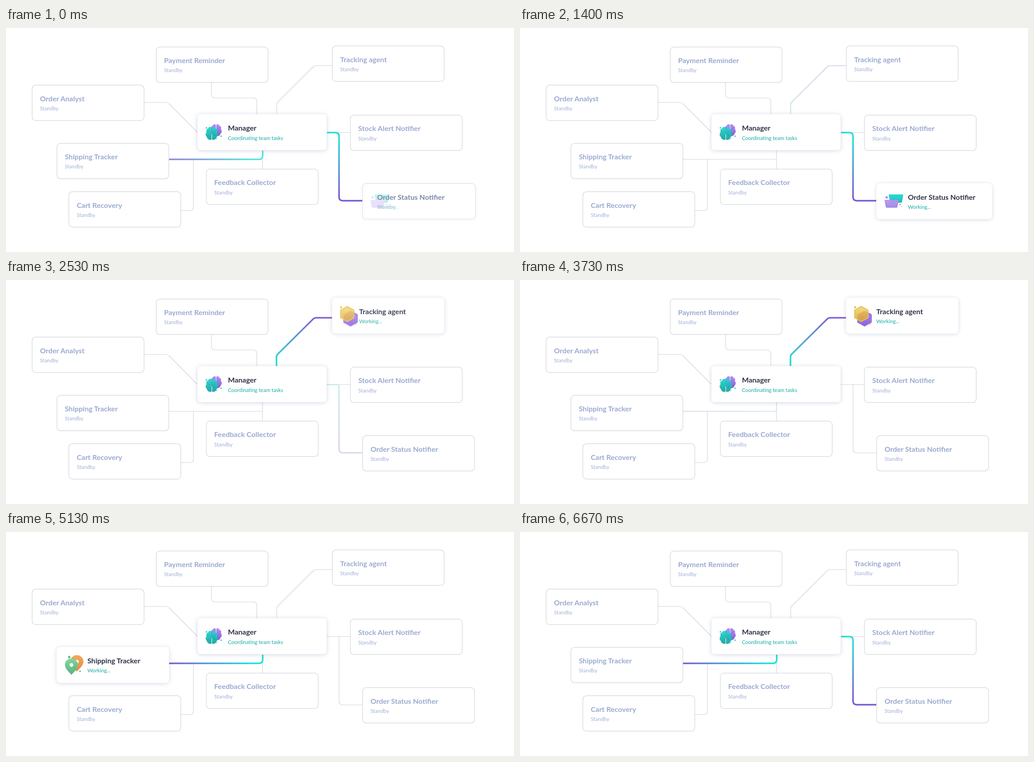
An HTML page for the animation above (6800 ms loop, 1125 by 498 pixels).

```html
<!DOCTYPE html>
<html lang="en">
<head>
<meta charset="utf-8">
<title>Agent team</title>
<style>
  html, body { margin: 0; width: 100%; height: 100%; overflow: hidden; background: #fff; }
  svg { display: block; width: 100%; height: 100%; }
  text { font-family: Lato, sans-serif; }
  .title { font-size: 16px; font-weight: 700; fill: #9aaad0; }
  .sub { font-size: 11.5px; fill: #9fafd6; }
  .busy { fill: #12aca4; }
  .dark { fill: #2f3347; }
  .wire { fill: none; stroke: #d2d4d9; stroke-width: 1.2; }
  .live { fill: none; stroke-width: 3.5; }
  .box { fill: #fff; stroke: #d3d5da; stroke-width: 1.2; }
  .glow { fill: #fff; filter: drop-shadow(0 1px 5px rgba(85, 100, 155, .27)); }
</style>
</head>
<body>
<svg viewBox="0 0 1125 498">
  <defs>
    <linearGradient id="gOrder" gradientUnits="userSpaceOnUse" x1="0" y1="232" x2="0" y2="384">
      <stop offset=".08" stop-color="#22e0d6"/><stop offset=".92" stop-color="#7a5ad3"/>
    </linearGradient>
    <linearGradient id="gTrack" gradientUnits="userSpaceOnUse" x1="0" y1="190" x2="0" y2="84">
      <stop offset=".12" stop-color="#22dcd4"/><stop offset="1" stop-color="#8460d8"/>
    </linearGradient>
    <linearGradient id="gShip" gradientUnits="userSpaceOnUse" x1="568" y1="0" x2="361" y2="0">
      <stop offset=".1" stop-color="#22e0d6"/><stop offset="1" stop-color="#7a5ad3"/>
    </linearGradient>
    <linearGradient id="teal" x2="0" y2="1"><stop stop-color="#20dccd"/><stop offset="1" stop-color="#1ba3a2"/></linearGradient>
    <linearGradient id="aqua" x2="0" y2="1"><stop stop-color="#22ddd0"/><stop offset="1" stop-color="#1fb9b6"/></linearGradient>
    <linearGradient id="violet" x2="0" y2="1"><stop stop-color="#b78ef6"/><stop offset="1" stop-color="#8660d6"/></linearGradient>
    <linearGradient id="lilac" x2="0" y2="1"><stop stop-color="#b795f3"/><stop offset="1" stop-color="#9a80df"/></linearGradient>
    <linearGradient id="gold" x2="0" y2="1"><stop stop-color="#f6df70"/><stop offset="1" stop-color="#dba647"/></linearGradient>
    <linearGradient id="orange" x2="0" y2="1"><stop stop-color="#f2a75c"/><stop offset="1" stop-color="#e58a45"/></linearGradient>
    <linearGradient id="green" x2="0" y2="1"><stop stop-color="#80d79c"/><stop offset="1" stop-color="#4bae78"/></linearGradient>

    <path id="half" d="M-.5-13.5C-3-16-8-14.500-8-11C-12-10-13-6-11.500-3C-14.500 0-14 6-11 7.500C-10.500 12-5 16-.5 13.500Z"/>
    <g id="brain"><use href="#half"/><use href="#half" transform="scale(-1 1)"/></g>
    <path id="hex" stroke-width="3" stroke-linejoin="round" d="M0-16.500L14.500-8.300V8.300L0 16.500L-14.500 8.300V-8.300Z"/>
    <path id="pin" fill-rule="evenodd" d="M0 22C-4 17-14.500 9-14.500 0A14.500 14.500 0 0 1 14.500 0C14.500 9 4 17 0 22ZM-4 0A4 4 0 0 0 4 0A4 4 0 0 0-4 0Z"/>
  </defs>

  <g class="wire">
    <path d="M455 121V147Q455 155.500 463 155.500H547Q555.500 155.500 555.500 164V192"/>
    <path d="M305 165.500H353Q358 165.500 361.500 169L424 232"/>
    <path d="M722 83.500H687Q683 83.500 680 86.500L602 164.500Q599.500 167 599.500 170V192"/>
    <path d="M710 232.500H762M737.500 232.500V376Q737.500 384.500 746 384.500H789"/>
    <path d="M361 292H568M568 271V313M387 406H407Q415 406 415 398V292"/>
  </g>
  <g class="live">
    <path id="lineOrder" stroke="url(#gOrder)" d="M711 232.500H729Q737.500 232.500 737.500 241V375.500Q737.500 384 746 384H789"/>
    <path id="lineTrack" stroke="url(#gTrack)" d="M722 84H687Q683 84 680 87L602 164.500Q599 167.500 599 171V191"/>
    <path id="lineShip" stroke="url(#gShip)" d="M361 292H560Q568.500 292 568.500 283.500V273"/>
  </g>

  <g id="cards"></g>

  <g id="manager">
    <rect class="glow" x="424" y="191.500" width="286" height="80" rx="8"/>
    <use href="#brain" fill="url(#violet)" transform="translate(465.200 227.500) scale(.93 .91)"/>
    <use href="#brain" fill="url(#teal)" opacity=".95" transform="translate(455.700 234.500)"/>
    <path d="M446 231q4-1 4 3M448 241q4 0 4-4M465 229q-4 1-4 4M465 240q-4 1-4-3M472 223q-3 0-3 4M470 235q3 0 4-3" fill="none" stroke="#137f8c" stroke-opacity=".3"/>
    <g fill="#20c9c0"><circle cx="444" cy="222" r="1.700"/><circle cx="476.300" cy="240.500" r="1.600"/><circle cx="466.500" cy="246" r="1"/></g>
    <text class="title dark" x="491.500" y="228">Manager</text>
    <text class="sub busy" x="491.500" y="248.500">Coordinating team tasks</text>
  </g>

  <g id="iconOrder">
    <path d="M818 370H847.500Q849 370 848.700 371.500L846 386.500Q845.500 388.500 843.500 388.500H822Q820 388.500 819.500 386.500L816.500 371.500Q816.300 370 818 370Z" fill="url(#aqua)"/>
    <path d="M808.500 382H837.500Q839 382 838.700 383.500L836 397.500Q835.500 399.500 833.500 399.500H812.500Q810.500 399.500 810 397.500L807.300 383.500Q807 382 808.500 382Z" fill="url(#lilac)" opacity=".95"/>
    <path d="M820 375.500H845M821 379.500H844M811 387.500H835M812 391.500H834M813 395.500H833" stroke="#fff" stroke-opacity=".18" stroke-dasharray="2 1.500"/>
    <g fill="#a98bea"><circle cx="812" cy="376.500" r="2.600"/><circle cx="841.500" cy="392.500" r="1.800"/><circle cx="844.800" cy="396.800" r="1.100"/></g>
  </g>
  <g id="iconTrack">
    <use href="#hex" x="763" y="85.500" fill="url(#violet)" stroke="#9870e2"/>
    <use href="#hex" x="755.800" y="75.500" fill="url(#gold)" stroke="#e8c35b" opacity=".94"/>
    <path d="M748.500 77.300L763 69L770.300 73.200V83.800L755.800 92L748.500 87.800Z" fill="#c98f3c" opacity=".3"/>
    <g fill="#e7b853"><circle cx="742" cy="60.800" r="2.300"/><circle cx="775" cy="98.200" r="1.400"/></g>
  </g>
  <g id="iconShip">
    <use href="#pin" x="157" y="288.300" fill="url(#orange)"/>
    <use href="#pin" x="145" y="295.500" fill="url(#green)" opacity=".95"/>
    <circle cx="145" cy="295.500" r="4" fill="#fff"/>
    <g fill="#5fbd87"><circle cx="140" cy="278" r="2.700"/><circle cx="164" cy="309.500" r="1.800"/></g>
  </g>
</svg>
<script>
const LOOP = 6800, SPAN = 600, FPS = 15;
const $ = id => document.getElementById(id);

function add(parent, tag, attrs, label) {
  const el = document.createElementNS('http://www.w3.org/2000/svg', tag);
  for (const k in attrs) el.setAttribute(k, attrs[k]);
  if (label) el.textContent = label;
  return parent.appendChild(el);
}

// cubic-bezier(.25, .1, .25, 1)
function ease(x) {
  if (x <= 0) return 0;
  if (x >= 1) return 1;
  const curve = (s, a, b) => 3 * s * (1 - s) ** 2 * a + 3 * s * s * (1 - s) * b + s ** 3;
  let lo = 0, hi = 1;
  for (let i = 0; i < 24; i++) {
    const mid = (lo + hi) / 2;
    if (curve(mid, .25, .25) < x) lo = mid; else hi = mid;
  }
  return curve(lo, .1, 1);
}

// 0..1 for something switched on and off once per loop
const level = (t, on, off) =>
  (on > off ? 1 : 0) + ease((t - on) / SPAN) - ease((t - off) / SPAN);
const mix = (a, b, p) => `rgb(${a.map((v, i) => Math.round(v + (b[i] - v) * p))})`;

function makeCard(name, x, y, act) {
  const g = add($('cards'), 'g');
  const rect = cls => add(g, 'rect', { class: cls, x: x + .6, y: y + .6, width: 247.800, height: 78.800, rx: 8 });
  const glow = act && rect('glow');
  const box = rect('box');
  if (act) g.append($(act.icon));
  const words = add(g, 'g');
  const text = (cls, dy, s) => add(words, 'text', { class: cls, x: x + 18, y: y + dy }, s);
  const title = text('title', 36.300, name);
  const idle = text('sub', 56.700, 'Standby');
  if (!act) return;
  const busy = text('sub busy', 56.700, 'Working...');
  const icon = $(act.icon);
  return t => {
    const p = level(t, act.on, act.off);
    const out = .5 * p;
    for (const r of [glow, box]) {
      r.setAttribute('x', x + .6 - out);
      r.setAttribute('y', y + .6 - out);
      r.setAttribute('width', 247.800 + 2 * out + act.grow * p);
      r.setAttribute('height', 78.800 + 2 * out);
    }
    glow.style.opacity = p;
    box.style.strokeOpacity = 1 - p;
    icon.style.opacity = p;
    words.setAttribute('transform', `translate(${act.shift * p} 0)`);
    title.style.fill = mix([154, 170, 208], [47, 51, 71], p);
    idle.style.opacity = 1 - p;
    busy.style.opacity = p;
  };
}

const cards = [
  makeCard('Payment Reminder', 332, 41.700),
  makeCard('Tracking agent', 722, 39.300, { icon: 'iconTrack', on: 2200, off: 3725, shift: 49.300, grow: 0 }),
  makeCard('Order Analyst', 57.300, 126.300),
  makeCard('Shipping Tracker', 112.200, 255.700, { icon: 'iconShip', on: 4535, off: 6060, shift: 50, grow: 0 }),
  makeCard('Cart Recovery', 138.700, 363.300),
  makeCard('Feedback Collector', 443, 313),
  makeCard('Stock Alert Notifier', 762, 193),
  makeCard('Order Status Notifier', 789.200, 345.200, { icon: 'iconOrder', on: -115, off: 1390, shift: 52.300, grow: 7.500 })
].filter(Boolean);

const lines = [['lineOrder', 6020, 2200], ['lineTrack', 1345, 4535], ['lineShip', 3690, -115]];

function draw(now) {
  const t = Math.floor((now % LOOP + 4) * FPS / 1000) * 1000 / FPS % LOOP;
  cards.forEach(update => update(t));
  for (const [id, on, off] of lines) $(id).style.opacity = level(t, on, off);
}

let start;
function tick(now) {
  start ??= now;
  draw(now - start);
  requestAnimationFrame(tick);
}
draw(0);
requestAnimationFrame(tick);
</script>
</body>
</html>
```
